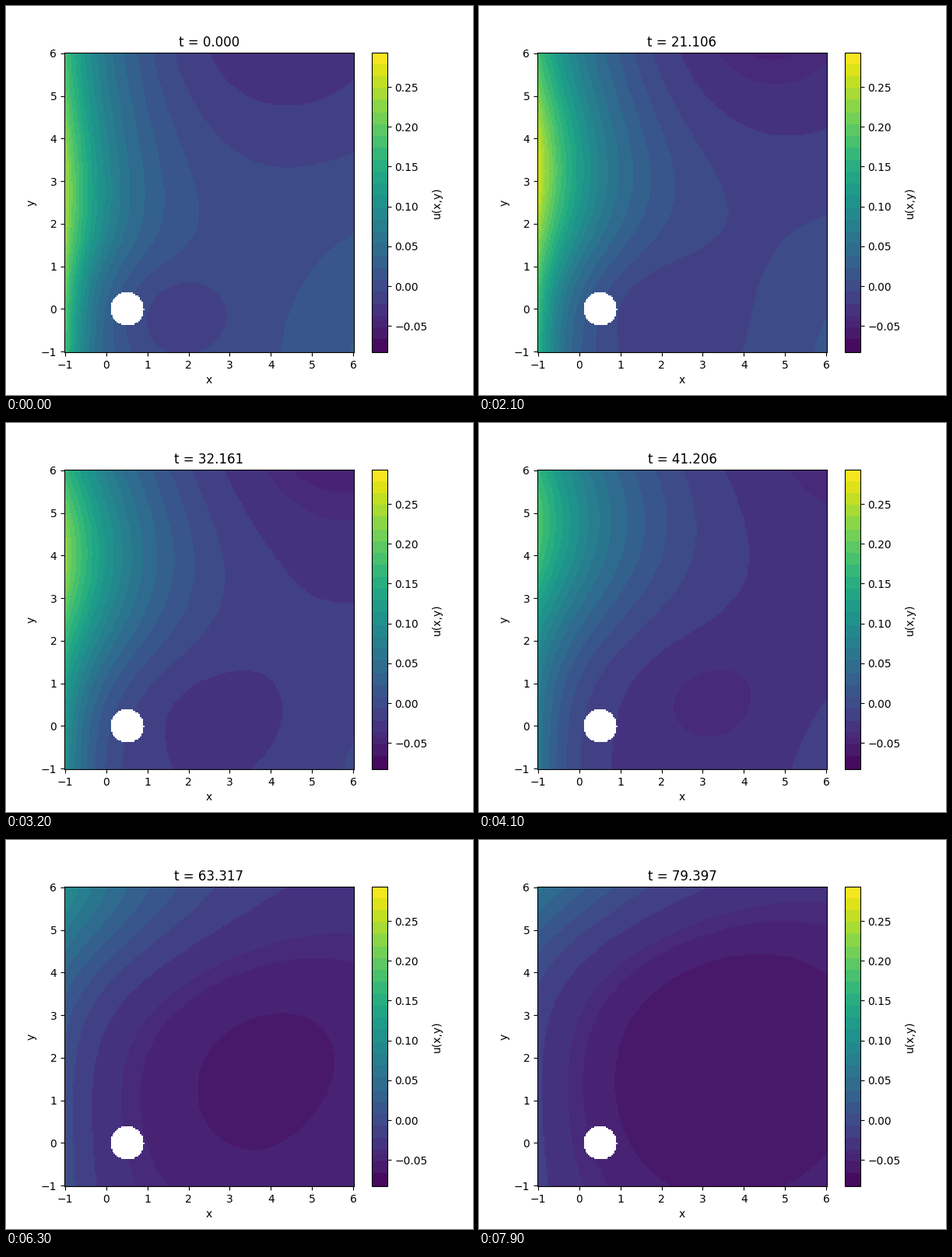
Animation of 600 by 500 pixels, one loop 8000 ms. Source, as a matplotlib script:

```python
import numpy as np
import matplotlib.pyplot as plt
from matplotlib.animation import FuncAnimation
from matplotlib.colors import ListedColormap

FRAMES, N = 80, 200
LO, HI, BANDS = -0.083, 0.293, 25

axis = np.linspace(-1, 6, N)
half = 3.5 / (N - 1)
X, Y = np.meshgrid(axis, axis)
hole = (X - 0.5) ** 2 + Y ** 2 < 0.4 ** 2


def ease(s, a, b):
    p = np.clip((s - a) / (b - a), 0, 1)
    return p * p * (3 - 2 * p)


def bump(x0, y0, rx, ry, power=2):
    return np.exp(-np.hypot((X - x0) / rx, (Y - y0) / ry) ** power)


def banded_map():
    # even steps of viridis, with one thin extra band near the dark end
    edges = np.sort(np.append(np.linspace(0, 256, BANDS + 1), 27))
    k = np.searchsorted(edges, np.arange(256), side="right") - 1
    return ListedColormap(plt.cm.viridis((edges[k] + edges[k + 1] + 4) / 512))


def inflow(s):
    """Plume at the left wall: its crest climbs, weakens and reaches further in."""
    strength = (13.5 + 5.8 * np.cos(np.pi * (s - 0.15) / 0.85)
                - 2.3 * (1 - ease(s, 0, 0.12)))
    crest = 2.7 + 4.6 * ease(s, 0.05, 1.05)
    floor = 0.72 - 0.53 * s
    profile = floor + (1 - floor) * np.exp(-((Y - crest) / 2.4) ** 2)
    # the obstacle shortens the reach below a rising height
    shelter_top = 1.2 + 4 * ease(s, 0.3, 1.1)
    shelter = 1 / (1 + np.exp((Y - shelter_top) / (0.4 + 0.5 * s)))
    reach = (1.1 + 2.1 * s ** 1.4) * (1 - (0.44 + 0.32 * s) * shelter)
    return strength * profile * np.exp(-(X + 1) / reach)


def background(s):
    """Slow level with a warm lower corner, a cool top and a growing cool wake."""
    level = 5.4 - 2.1 * ease(s, 0.05, 0.55)
    corner = (2.2 - 1.9 * ease(s, 0.3, 0.75)) * bump(7.5, -1.5, 3, 3.5)
    top = (2.6 * (1 - ease(s, 0.2, 0.75))
           * bump(4.1 + 2 * ease(s, 0.2, 0.6), 6.8, 3.3, 2.8))
    depth = 1 - 0.4 * ease(s, 0.05, 0.4) + 1.3 * ease(s, 0.45, 1.05)
    grow = ease(s, 0.45, 0.85)
    wake = depth * bump(1.7 + 2.2 * ease(s, 0.05, 0.75),
                        -0.2 + 1.8 * ease(s, 0.2, 0.9),
                        1.4 + 3.2 * grow, 1 + 3.2 * grow, power=3)
    return level + corner - top - wake


def field(i):
    s = i / (FRAMES - 1)
    band = inflow(s) + background(s)
    return np.ma.array(LO + (HI - LO) * band / BANDS, mask=hole)


fig, ax = plt.subplots(figsize=(6, 5), dpi=100)
box = (-1 - half, 6 + half)
img = ax.imshow(field(0), origin="lower", extent=box + box, aspect="auto",
                cmap=banded_map(), vmin=LO, vmax=HI, interpolation="nearest")
fig.colorbar(img, ax=ax, label="u(x,y)")
ax.set_xlabel("x")
ax.set_ylabel("y")
title = ax.set_title("t = 0.000")


def update(i):
    img.set_data(field(i))
    title.set_text(f"t = {i * 200 / 199:.3f}")
    return img, title


anim = FuncAnimation(fig, update, frames=FRAMES, interval=100, repeat=True,
                     repeat_delay=0)
plt.show()
```
